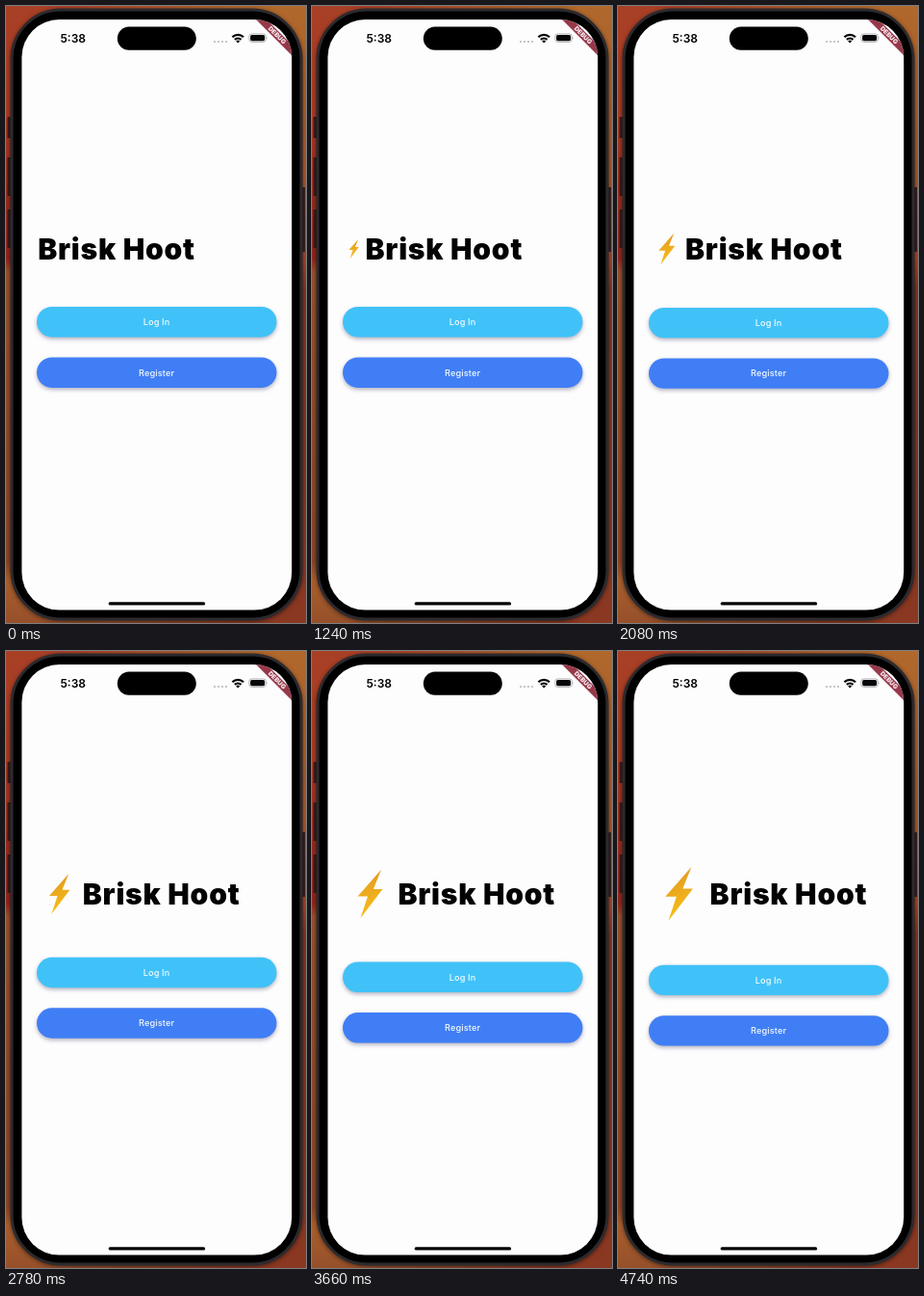
An HTML page that plays this animation: 312 by 640 pixels, repeating every 4.84 s.

```html
<!DOCTYPE html>
<html lang="en">
<head>
<meta charset="utf-8">
<title>Welcome screen</title>
<style>
  html, body { margin: 0; width: 100%; height: 100%; overflow: hidden; }
  svg { display: block; width: 312px; height: 640px; font-family: Inter, sans-serif; }
  .phone { filter: drop-shadow(0 1px 2px rgba(0, 0, 0, .5)); }
  .title { font-size: 30px; font-weight: 900; letter-spacing: .8px; fill: #020203; }
  .clock { font-size: 12px; font-weight: 600; }
  .button rect { filter: drop-shadow(0 2.4px 2px rgba(30, 30, 70, .34)); }
  .button text { font-size: 9.14px; font-weight: 500; letter-spacing: .15px; fill: #f4fbff; text-anchor: middle; }
  .debug { font-size: 6.6px; font-weight: 900; fill: #f6e6ea; text-anchor: middle; }
</style>
</head>
<body>
<svg viewBox="0 0 312 640">
  <defs>
    <linearGradient id="wallLeft" x2="0" y2="1">
      <stop stop-color="#a84026"/>
      <stop offset=".18" stop-color="#a83a22"/>
      <stop offset=".3" stop-color="#982a1e"/>
      <stop offset=".41" stop-color="#92241c"/>
      <stop offset=".43" stop-color="#98502a"/>
      <stop offset=".9" stop-color="#8c4424"/>
      <stop offset=".93" stop-color="#a85e2c"/>
      <stop offset="1" stop-color="#96502a"/>
    </linearGradient>
    <linearGradient id="wallRight" x2="0" y2="1">
      <stop stop-color="#b0682c"/>
      <stop offset=".28" stop-color="#a8582a"/>
      <stop offset=".41" stop-color="#a44426"/>
      <stop offset=".46" stop-color="#843420"/>
      <stop offset="1" stop-color="#8a3822"/>
    </linearGradient>
    <linearGradient id="wallBlend">
      <stop offset=".2" stop-color="#fff" stop-opacity="0"/>
      <stop offset=".8" stop-color="#fff"/>
    </linearGradient>
    <mask id="rightSide"><rect width="312" height="640" fill="url(#wallBlend)"/></mask>
    <linearGradient id="boltFill" x1=".4" x2=".6" y2="1">
      <stop offset=".1" stop-color="#e29c20"/>
      <stop offset=".9" stop-color="#f8bd18"/>
    </linearGradient>
    <clipPath id="screen"><rect x="16.4" y="14" width="280.8" height="612.6" rx="39"/></clipPath>
  </defs>

  <rect width="312" height="640" fill="url(#wallLeft)"/>
  <rect width="312" height="640" fill="url(#wallRight)" mask="url(#rightSide)"/>
  <g fill="#3a1c1a">
    <rect x="1.5" y="115" width="5" height="22"/>
    <rect x="1.5" y="157" width="5" height="40"/>
    <rect x="1.5" y="211" width="5" height="40"/>
    <rect x="307" y="188" width="4" height="67"/>
  </g>

  <rect class="phone" x="6" y="4" width="301" height="632" rx="51" fill="#020203" stroke="#2c2a2e" stroke-width="3"/>
  <rect x="8" y="6" width="297" height="628" rx="48" fill="#000"/>
  <rect x="16.4" y="14" width="280.8" height="612.6" rx="39" fill="#fdfdfe"/>

  <text class="clock" x="56.5" y="38">5:38</text>
  <rect x="115.8" y="21.6" width="82" height="24.2" rx="12.1" fill="#000"/>
  <g fill="#b4b4b8">
    <circle cx="217" cy="37" r="1"/><circle cx="221" cy="37" r="1"/>
    <circle cx="225" cy="37" r="1"/><circle cx="229" cy="37" r="1"/>
  </g>
  <path d="M235.4 32.2a8.2 8.2 0 0 1 11.6 0M237.9 34.9a4.7 4.7 0 0 1 6.6 0" fill="none" stroke="#060608" stroke-width="2.3"/>
  <path d="M239.2 36.4a2.9 2.9 0 0 1 4 0l-2 2.1z" fill="#060608"/>
  <rect x="252.9" y="28.9" width="17.4" height="8.4" rx="2.6" fill="none" stroke="#a0a0a4" stroke-width=".8"/>
  <rect x="254.1" y="30" width="15" height="6.2" rx="1.6" fill="#060608"/>
  <path d="M271.3 31.7q1.3 1.4 0 2.8z" fill="#a0a0a4"/>

  <g clip-path="url(#screen)">
    <path d="M260 14h11l27 27v11z" fill="#96384a"/>
    <text class="debug" transform="translate(282 30.2) rotate(45)" y="2.3">DEBUG</text>
  </g>

  <path id="bolt" fill="url(#boltFill)" d="M.705-.45L.27.045H.455L.32.45L.73-.09H.56z"/>
  <text id="title" class="title" y="263">Brisk Hoot</text>

  <g id="buttons">
    <g class="button">
      <rect x="32" y="312" width="249.5" height="31.4" rx="15.7" fill="#40c2f8"/>
      <text x="156.6" y="331">Log In</text>
    </g>
    <g class="button">
      <rect x="32" y="364.5" width="249.5" height="31.4" rx="15.7" fill="#407ef6"/>
      <text x="156.6" y="383.5">Register</text>
    </g>
  </g>

  <rect x="106.6" y="618.2" width="100.6" height="3.4" rx="1.7" fill="#000"/>
</svg>
<script>
  const LOOP = 4840, LEFT = 32.4, CENTER = 252;
  const FULL_SIZE = 64, ROW_HEIGHT = 35;
  const [bolt, title, buttons] = ['bolt', 'title', 'buttons'].map(id => document.getElementById(id));

  // Steps come in threes, every 140 ms, held for 20, 100 and 20 ms.
  function stepAt(ms) {
    const phase = ms % 140;
    return 3 * Math.floor(ms / 140) + (phase >= 20) + (phase >= 120);
  }

  // The logo grows with a decelerating curve.
  function logoSize(step) {
    const x = Math.min(1, Math.max(0, (step - 3.7) / 115.7));
    return FULL_SIZE * (1 - (1 - x) ** 2);
  }

  function draw(now) {
    const size = logoSize(stepAt(now % LOOP));
    const drop = Math.max(0, (size - ROW_HEIGHT) / 2);
    bolt.setAttribute('transform', `translate(${LEFT} ${CENTER}) scale(${size})`);
    title.setAttribute('x', LEFT + size + 0.8);
    buttons.setAttribute('transform', `translate(0 ${drop})`);
  }

  const start = performance.now();
  function tick() {
    draw(performance.now() - start);
    requestAnimationFrame(tick);
  }
  tick();
</script>
</body>
</html>
```
